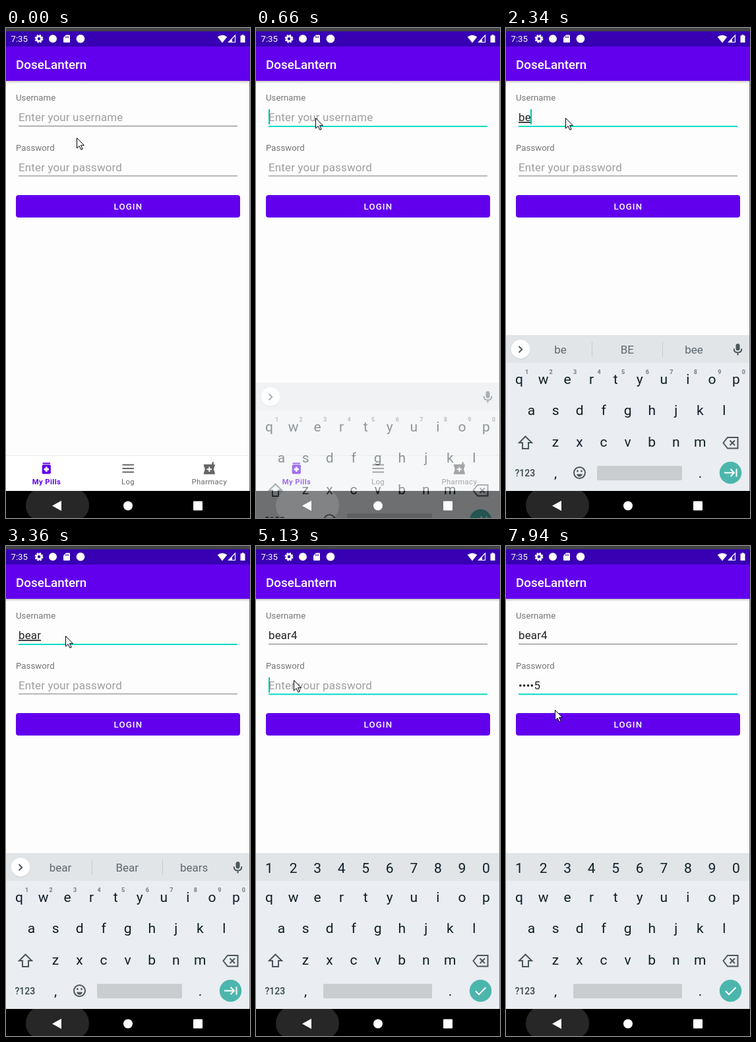
Animation of 370x742 px, one loop 8000 ms. Source, as an HTML page:

```html
<!DOCTYPE html>
<html lang="en">
<head>
<meta charset="utf-8">
<title>Login</title>
<style>
  html, body { margin: 0; width: 100%; height: 100%; overflow: hidden; background: #fdfdfd; }
  svg { display: block; width: 370px; height: 742px; overflow: hidden; }
  text { font-family: Roboto, sans-serif; white-space: pre; }
  .field { font-size: 16.96px; letter-spacing: .16px; fill: #212121; }
  .hint { fill: #9e9e9e; }
  .composing { text-decoration: underline; text-decoration-thickness: 1px; }
  .label { font-size: 13.2px; letter-spacing: .05px; fill: #757575; }
  .tab { font-size: 11.3px; letter-spacing: .38px; text-anchor: middle; }
  .key { font-size: 21px; fill: #0e1e27; text-anchor: middle; }
  .sup { font-size: 9px; font-weight: 700; fill: #727c82; text-anchor: middle; }
  .word { font-size: 17px; fill: #5d686f; text-anchor: middle; }
  .line { fill: none; stroke: #4b575e; stroke-width: 2; }
</style>
</head>
<body>
<svg viewBox="0 0 370 742">
  <defs>
    <linearGradient id="shade" x2="0" y2="1">
      <stop stop-opacity=".22"/><stop offset="1" stop-opacity="0"/>
    </linearGradient>
  </defs>

  <rect width="370" height="742" fill="#fdfdfd"/>
  <rect y="80" width="370" height="4" fill="url(#shade)"/>
  <rect width="370" height="6" fill="#444"/>
  <rect y="5" width="370" height="23" fill="#3700b3"/>
  <rect y="28" width="370" height="52" fill="#6200ee"/>

  <!-- status bar -->
  <g fill="#fff">
    <text x="7.5" y="21" font-size="13.2">7:35</text>
    <g fill="none" stroke="#fff">
      <circle cx="50" cy="16.3" r="3.6" stroke-width="2.8"/>
      <circle cx="50" cy="16.3" r="5.4" stroke-width="2" stroke-dasharray="2.6 1.64"/>
    </g>
    <circle cx="71" cy="16.3" r="6"/>
    <path d="M91 10.5h5q1 0 1 1v9.5q0 1-1 1h-8q-1 0-1-1v-6.5z"/>
    <path d="M90.5 12.5v2.5m2-2.5v2.5m2-2.5v2.5" stroke="#3700b3"/>
    <circle cx="113" cy="16.3" r="6.3"/>
    <path d="M328 22.5l-7.3-9q7.3-5.5 14.600 0z"/>
    <path d="M347.500 11v10.500h-10z" fill="none" stroke="#fff" stroke-width="1.200"/>
    <path d="M343 16.500v5h-5z"/>
    <path d="M357.500 10.200h3v1.300h2v10.500h-7v-10.500h2z"/>
  </g>
  <text x="15" y="62" font-size="18.84" font-weight="500" fill="#fff">DoseLantern</text>

  <!-- form -->
  <text class="label" x="15" y="110">Username</text>
  <text class="label" x="15" y="186">Password</text>
  <rect id="rest1" x="19" y="148" width="332" height="1" fill="#777"/>
  <rect id="live1" x="19" y="148" width="332" height="2" fill="#03dac5"/>
  <rect id="rest2" x="19" y="223.500" width="332" height="1" fill="#777"/>
  <rect id="live2" x="19" y="223.500" width="332" height="2" fill="#03dac5"/>
  <g id="words"></g>
  <rect id="caret1" y="123" width="2" height="23" fill="#03c4b2"/>
  <rect id="caret2" y="199" width="2" height="23" fill="#03c4b2"/>
  <rect x="15" y="253" width="340" height="34" rx="4" fill="#6200ee"/>
  <text x="163.500" y="275" font-size="13.2" font-weight="500" letter-spacing="1.18" fill="#fff">LOGIN</text>

  <!-- tabs -->
  <rect y="647" width="370" height="54" fill="#fff"/>
  <rect y="647" width="370" height="1" fill="#ececec"/>
  <g fill="#6200ee">
    <path transform="translate(50 655.5) scale(.942)" d="M6 3h12v2H6zM17 6H7c-1.100 0-2 .9-2 2v11c0 1.100.9 2 2 2h10c1.100 0 2-.9 2-2V8c0-1.100-.9-2-2-2zm-1 9h-2.500v2.500h-3V15H8v-3h2.500V9.500h3V12H16z"/>
    <text class="tab" x="61.5" y="691" font-weight="700">My Pills</text>
  </g>
  <g fill="#666">
    <path d="M176.500 661.500h17.500m-17.500 5.500h17.500m-17.500 5.500h17.500" stroke="#666" stroke-width="1.900"/>
    <text class="tab" x="185" y="691">Log</text>
    <path transform="translate(297 656) scale(.942)" d="M21 5h-2.640l1.140-3.140L17.150 1l-1.460 4H3v2l2 6-2 6v2h18v-2l-2-6 2-6zm-5 9h-3v3h-2v-3H8v-2h3V9h2v3h3z"/>
    <text class="tab" x="308.300" y="691">Pharmacy</text>
  </g>
  <rect y="701" width="370" height="41" fill="#000"/>
  <path d="M41 701h74q11 9 11 22t-10 19h-76q-10-6-10-19t11-22z" fill="#272727"/>

  <!-- keyboard -->
  <g id="board">
    <rect y="465" width="370" height="236" fill="#eaedf1"/>
    <rect y="465" width="370" height="42" fill="#e1e5e8"/>
    <g id="keys"></g>
    <path class="line" d="M29.500 618.500l9.500 9.500h-5v9h-9v-9h-5z"/>
    <path class="line" d="M336 620h15.500v16.500h-15.500l-6.500-8.250zm3.500 4.500l7.500 7.500m0-7.500l-7.500 7.500" stroke-width="1.800"/>
    <text x="13.500" y="679" font-size="14" font-weight="500" fill="#37454d">?123</text>
    <text class="key" x="75" y="681">,</text>
    <text class="key" x="294.500" y="681">.</text>
    <circle cx="340.500" cy="673.500" r="16.700" fill="#4db6ac"/>
    <g fill="none" stroke="#fff" stroke-width="2">
      <path id="next" d="M331 673.500h15m-5.500-5.500l5.500 5.500-5.500 5.500M349.500 667.500v12"/>
      <path id="done" d="M333 674l5 5 10.500-10.500"/>
    </g>

    <g id="plain">
      <rect x="138" y="663" width="129" height="22" rx="2" fill="#c9cdd0"/>
      <circle class="line" cx="111.500" cy="673.500" r="8.500" stroke-width="1.700"/>
      <path d="M107 675.500h9q-1.200 4-4.500 4t-4.500-4z" fill="#4b575e"/>
      <circle cx="108.500" cy="671" r="1.400" fill="#4b575e"/>
      <circle cx="114.500" cy="671" r="1.400" fill="#4b575e"/>
      <circle cx="22" cy="487.500" r="14.300" fill="#000" opacity=".12"/>
      <circle cx="22" cy="486.500" r="14.200" fill="#fff"/>
      <path id="fold" class="line" d="M24.500 482l-4.700 4.700 4.700 4.700" stroke-width="1.800"/>
      <path id="unfold" class="line" d="M19.500 482l4.700 4.700-4.700 4.700" stroke-width="1.800"/>
      <rect x="348.500" y="478" width="6" height="10.500" rx="3" fill="#4b575e"/>
      <path class="line" d="M345.700 485.500q0 6 5.800 6t5.800-6m-5.800 6v4" stroke-width="1.600"/>
    </g>

    <g id="tools">
      <circle class="line" cx="69" cy="485" r="5.200"/>
      <path class="line" d="M73 489l6 6" stroke-width="2.300"/>
      <path class="line" d="M119 480h11.500q1.500 0 1.500 1.500v8l-5 5h-8q-1.500 0-1.500-1.500v-11.500q0-1.500 1.500-1.500zm2 7.500q3.500 4 7.500 0" stroke-width="1.700"/>
      <path d="M127 494.500v-5h5zM120.500 482.500h2.500v2.500h-2.500zM126.500 482.500h2.500v2.500h-2.500z" fill="#4b575e"/>
      <text x="166" y="491.500" font-size="13.500" font-weight="900" fill="#4b575e">GIF</text>
      <rect x="225.500" y="479" width="15" height="16" rx="1.500" fill="#5d686f"/>
      <path d="M265.500 476v22" stroke="#cdd1d4"/>
      <g fill="#4b575e"><circle cx="292.700" cy="487" r="1.900"/><circle cx="299" cy="487" r="1.900"/><circle cx="305.300" cy="487" r="1.900"/></g>
    </g>
    <path id="bars" d="M130.500 475v23M237.500 475v23" stroke="#c6cbce"/>
    <g id="picks"></g>
    <g id="digits"><rect x="102" y="663" width="165" height="22" rx="2" fill="#c9cdd0"/></g>
  </g>

  <!-- system buttons -->
  <g fill="#fff">
    <path d="M70 723.500l14-7.800v15.600z"/>
    <circle cx="185" cy="723.500" r="7"/>
    <rect x="284" y="716.500" width="14" height="14" rx="1"/>
  </g>
  <rect x="369" y="80" width="1" height="621" fill="#777"/>
  <path id="mouse" d="M.5.5v15.500l3.600-3.400 2.800 5.700 2.300-1.100-2.700-5.500h4.900z" fill="#fff" stroke="#000"/>
</svg>

<script>
const LOOP = 8000;
const $ = id => document.getElementById(id);

// rows: [time, styles]; each pose holds until the next row
function play(el, rows) {
  const frames = rows.map(([t, style]) => ({ offset: t / LOOP, easing: 'step-end', ...style }));
  frames.push({ offset: 1, ...rows.at(-1)[1] });
  el.animate(frames, { duration: LOOP, iterations: Infinity });
}

function show(el, from, to = LOOP) {
  const rows = [[0, { opacity: from ? 0 : 1 }]];
  if (from) rows.push([from, { opacity: 1 }]);
  if (to < LOOP) rows.push([to, { opacity: 0 }]);
  play(el, rows);
}

function write(parent, text, x, y, cls) {
  const el = document.createElementNS('http://www.w3.org/2000/svg', 'text');
  el.setAttribute('x', x);
  el.setAttribute('y', y);
  el.setAttribute('class', cls);
  el.textContent = text;
  return $(parent).appendChild(el);
}

const shift = (x, y) => ({ transform: `translate(${x}px, ${y}px)` });

const PITCH = 36.55;
[['qwertyuiop', 20, 538.5], ['asdfghjkl', 38.5, 586], ['zxcvbnm', 75, 634]].forEach(([row, x, y]) =>
  [...row].forEach((c, i) => write('keys', c, x + i * PITCH, y, 'key')));

const FOCUS2 = 5020, PASS = 5130;
[...'1234567890'].forEach((c, i) => {
  show(write('keys', c, 31.5 + i * PITCH, 524, 'sup'), 0, PASS);
  write('digits', c, 20 + i * PITCH, 495, 'key');
});

// [text, baseline, class, from, to]
[
  ['Enter your username', 141, 'hint', 0, 2340],
  ['be', 141, 'composing', 2340, 2520],
  ['bea', 141, 'composing', 2520, 2800],
  ['bear', 141, 'composing', 2800, 3820],
  ['bear4', 141, 'composing', 3820, FOCUS2],
  ['bear4', 141, '', FOCUS2],
  ['Enter your password', 217, 'hint', 0, 5770],
  ['1', 217, '', 5770, 6050],
  ['•2', 217, '', 6050, 6330],
  ['••3', 217, '', 6330, 6610],
  ['•••4', 217, '', 6610, 7070],
  ['••••5', 217, '', 7070]
].forEach(([text, y, cls, from, to]) => show(write('words', text, 19, y, 'field ' + cls), from, to));

[
  [['be', 'BE', 'bee'], 2340, 2520],
  [['bea', 'bear', 'beat'], 2520, 2800],
  [['bear', 'Bear', 'bears'], 2800, 3820],
  [['', 'bear4', ''], 3820, PASS]
].forEach(([list, from, to]) => list.forEach((w, i) =>
  show(write('picks', w, 82.5 + i * 101.3, 493, 'word'), from, to)));

show($('rest1'), FOCUS2);
play($('rest1'), [[0, { opacity: 1 }], [490, { opacity: 0 }], [FOCUS2, { opacity: 1 }]]);
show($('live1'), 490, FOCUS2);
show($('rest2'), 0, FOCUS2);
show($('live2'), FOCUS2);

// [time, x, lit]
const caret = (id, rows) => play($(id), rows.map(([t, x, lit]) => [t, { ...shift(x, 0), opacity: lit }]));
caret('caret1', [
  [0, 19, 0], [490, 19, 1], [1030, 19, 0], [1490, 19, 1], [2050, 19, 0],
  [2340, 37, 1], [2520, 46, 1], [2800, 52, 1], [3360, 52, 0],
  [3820, 61.5, 1], [4380, 61.5, 0], [4830, 61.5, 1], [FOCUS2, 61.5, 0]
]);
caret('caret2', [
  [0, 19, 0], [FOCUS2, 19, 1], [5590, 19, 0], [5770, 28.5, 1], [6050, 34, 1],
  [6330, 40, 1], [6610, 46, 1], [7070, 52, 1], [7680, 52, 0]
]);

play($('board'), [
  [0, { ...shift(0, 110), opacity: 0 }],
  [580, { ...shift(0, 100), opacity: .15 }],
  [660, { ...shift(0, 72), opacity: .47 }],
  [750, { ...shift(0, 0), opacity: 1 }]
]);
show($('plain'), 0, PASS);
show($('next'), 0, PASS);
show($('done'), PASS);
show($('digits'), PASS);
show($('tools'), 750, 2340);
show($('fold'), 750, 2340);
play($('unfold'), [[0, { opacity: 1 }], [750, { opacity: 0 }], [2340, { opacity: 1 }]]);
show($('bars'), 2340, 3820);

play($('mouse'), [
  [0, 107, 166], [90, 100, 152], [180, 93, 140], [270, 90, 136],
  [4470, 86, 143], [4560, 78, 162], [4650, 68, 182], [4740, 60, 196], [4830, 57, 203],
  [7770, 64, 222], [7860, 71, 239], [7940, 74, 248]
].map(([t, x, y]) => [t, shift(x, y)]));
</script>
</body>
</html>
```
